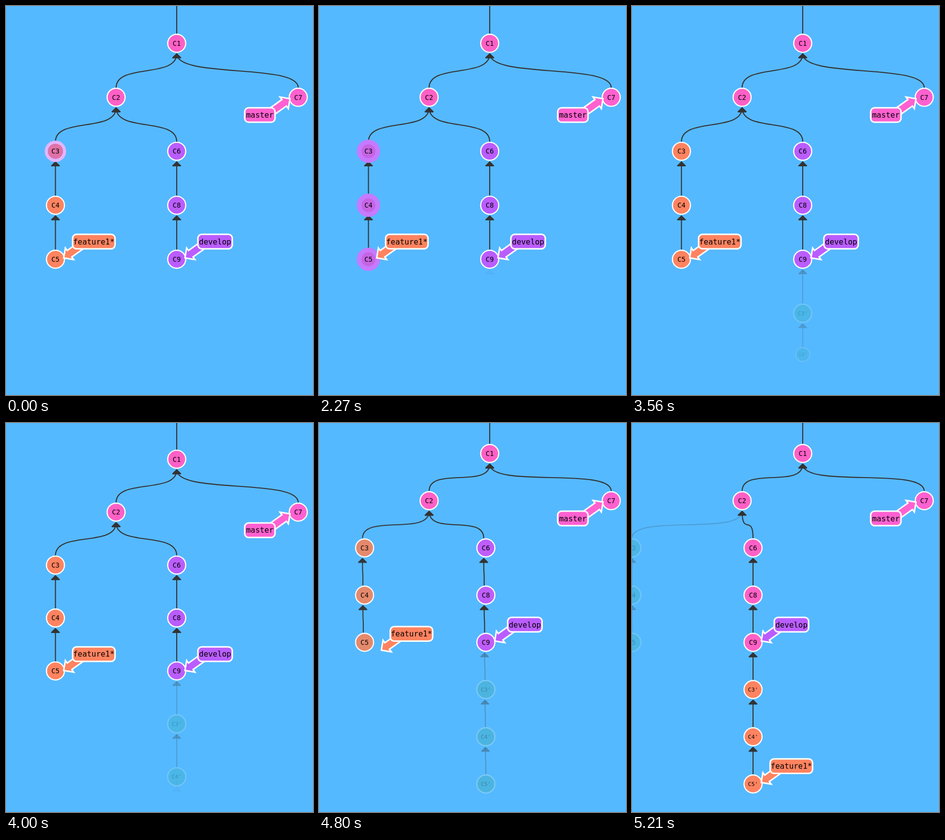
Write an HTML page with a canvas that moves like this. It is 624 by 791 pixels and loops after 7210 ms.

```html
<!DOCTYPE html>
<html lang="en">
<head>
<meta charset="utf-8">
<title>Rebase</title>
<style>
  html, body { margin: 0; width: 100%; height: 100%; overflow: hidden; background: #55b9ff; }
  canvas { display: block; width: 624px; height: 791px; }
</style>
</head>
<body>
<canvas></canvas>
<script>
const W = 624, H = 791, LOOP = 7210;
const BEAT = 101.35, BEAT_OFFSET = 35; // the picture holds for one beat
const LABEL_LAG = 9;
const STAGE = 765; // time for one commit to light up or to drop
const FONT = '"DejaVu Sans Mono", monospace';
const PINK = [255, 96, 198], MASTER = [255, 97, 208], PURPLE = [186, 93, 255];
const ORANGE = [255, 131, 96], ORPHAN = [35, 168, 140], WHITE = [255, 255, 255];

// Chains of commits, each hanging from a parent; later chains are drawn behind.
const CHAINS = [
  { kind: 'trunk', names: ['C0', 'C1'], level: 0, x: 347 },
  { kind: 'trunk', names: ['C2'], parent: 'C1', level: 2, x: 223.8 },
  { kind: 'master', names: ['C7'], parent: 'C1', level: 2, x: 594 },
  { kind: 'feature', names: ['C3', 'C4', 'C5'], parent: 'C2', level: 3, x: 100.5 },
  { kind: 'develop', names: ['C6', 'C8', 'C9'], parent: 'C2', level: 3, x: 347 },
  { kind: 'copy', names: ["C3'", "C4'", "C5'"], parent: 'C9', level: 6, x: 347 }
];

const ctx = document.querySelector('canvas').getContext('2d');
const ratio = window.devicePixelRatio || 1;
ctx.canvas.width = W * ratio;
ctx.canvas.height = H * ratio;
ctx.scale(ratio, ratio);
ctx.textAlign = 'center';

const lerp = (a, b, p) => a + (b - a) * p;
const mix = (a, b, p) => a.map((v, i) => lerp(v, b[i], p));
const css = c => `rgb(${c.map(Math.round).join(',')})`;

const sineOut = p => Math.sin(p * Math.PI / 2);
const smooth = p => p * p * (3 - 2 * p);
const cubicInOut = p => p < .5 ? 4 * p ** 3 : 1 - 4 * (1 - p) ** 3;
function bounce(p) {
  const k = 7.5625, hop = (mid, low) => k * (p - mid / 2.75) ** 2 + low;
  if (p < 1 / 2.75) return k * p * p;
  if (p < 2 / 2.75) return hop(1.5, .75);
  return p < 2.5 / 2.75 ? hop(2.25, .9375) : hop(2.625, .984375);
}
const tween = (t, start, length, ease) => ease(Math.min(1, Math.max(0, (t - start) / length)));

const rebaseAt = t => tween(t, 4640, 590, cubicInOut);
const gapAt = t => lerp(109.8, 96, tween(t, 3838, 440, cubicInOut));
const glowAt = (t, i) => tween(t, STAGE * i - 130, 440, sineOut) * (1 - tween(t, 2165, 370, smooth));
const growthAt = (t, i) => tween(t, 2165 + 865 * i, STAGE, bounce);

function buildNodes(t) {
  const gap = gapAt(t), rebase = rebaseAt(t), nodes = {};
  const rowY = level => -34 + gap * level;
  for (const { kind, names, parent, level: top, x } of CHAINS) {
    names.forEach((name, i) => {
      const level = top + i;
      const n = { name, x, y: rowY(level), parent: i ? names[i - 1] : parent, size: 1, alpha: 1, glow: 0, lead: 0 };
      if (level > 2) {
        n.x -= 101 * rebase;
        n.lead = -12 * rebase * (1 - rebase) * (8 - level);
      }
      if (kind === 'trunk') n.fill = PINK;
      if (kind === 'master') n.fill = MASTER;
      if (kind === 'develop') n.fill = mix(PURPLE, PINK, rebase);
      if (kind === 'feature') {
        n.glow = glowAt(t, i);
        n.fill = mix(mix(ORANGE, PURPLE, n.glow), ORPHAN, rebase);
        n.alpha = lerp(1, .2, rebase);
      }
      if (kind === 'copy') {
        n.size = growthAt(t, i);
        n.y = lerp(rowY(level - 1), n.y, n.size);
        n.fill = mix(ORPHAN, ORANGE, rebase);
        n.alpha = lerp(.2 * n.size, 1, rebase);
      }
      nodes[name] = n;
    });
  }
  return nodes;
}

// Line and arrowhead form one path, so a faded edge keeps an even tone.
function drawEdge(n, parent) {
  const x1 = n.x + n.lead, y1 = n.y - 19.5 * n.size;
  const x2 = parent.x + parent.lead, y2 = parent.y + 21.5;
  const bend = 50 * n.size, head = 8;
  ctx.globalAlpha = n.alpha;
  ctx.strokeStyle = ctx.fillStyle = '#333';
  ctx.lineWidth = 2.1;
  ctx.lineJoin = 'round';
  ctx.beginPath();
  ctx.moveTo(x1, y1);
  ctx.bezierCurveTo(x1, y1 - bend, x2, y2 + bend, x2, y2);
  ctx.lineTo(x2 - head, y2 + head);
  ctx.lineTo(x2 + head, y2 + head);
  ctx.lineTo(x2, y2);
  ctx.stroke();
  ctx.beginPath();
  ctx.moveTo(x2, y2);
  ctx.lineTo(x2 - head, y2 + head);
  ctx.lineTo(x2 + head, y2 + head);
  ctx.fill();
}

function drawNode(n) {
  ctx.globalAlpha = n.alpha;
  ctx.fillStyle = css(n.fill);
  ctx.strokeStyle = css(mix(WHITE, PURPLE, n.glow));
  ctx.lineWidth = (2.4 + 8.6 * n.glow) * n.size;
  ctx.beginPath();
  ctx.arc(n.x, n.y, (18.3 + .7 * n.glow) * n.size, 0, 2 * Math.PI);
  ctx.fill();
  ctx.stroke();
  const px = (n.name.length > 2 ? 11.3 : 13.8) * n.size;
  ctx.fillStyle = '#000';
  ctx.font = `${px}px ${FONT}`;
  ctx.fillText(n.name, n.x, n.y + px * .36);
}

// The arrow points at (x, y); side is 1 for a label up right, -1 for down left.
function drawBranch(text, x, y, side, fill) {
  const tip = 14.5, shaft = 8, length = 56;
  ctx.globalAlpha = 1;
  ctx.fillStyle = css(fill);
  ctx.strokeStyle = '#fff';
  ctx.lineWidth = 3;

  ctx.save();
  ctx.translate(x + side * 16.8, y - side * 2.8);
  ctx.rotate(side > 0 ? -.62 : Math.PI - .62);
  ctx.lineJoin = 'miter';
  ctx.beginPath();
  ctx.moveTo(0, 0);
  ctx.lineTo(tip, -tip);
  ctx.lineTo(tip, -shaft);
  ctx.lineTo(length, -shaft);
  ctx.lineTo(length, shaft);
  ctx.lineTo(tip, shaft);
  ctx.lineTo(tip, tip);
  ctx.closePath();
  ctx.fill();
  ctx.stroke();
  ctx.restore();

  const width = 12.5 + 8.2 * text.length;
  const cx = x + side * 78, cy = y - side * 36;
  ctx.beginPath();
  ctx.roundRect(cx - width / 2, cy - 14.7, width, 29.4, 8);
  ctx.fill();
  ctx.stroke();
  ctx.fillStyle = '#000';
  ctx.font = `15.5px ${FONT}`;
  ctx.fillText(text, cx, cy + 5.5);
}

function drawBranches(t) {
  const { C5, C7, C9 } = buildNodes(t), rebase = rebaseAt(t);
  drawBranch('master', C7.x, C7.y, -1, MASTER);
  drawBranch('develop', C9.x, C9.y, 1, PURPLE);
  drawBranch('feature1*', lerp(100.5, 246, rebase), lerp(C5.y, C5.y + 3 * gapAt(t), rebase), 1, ORANGE);
}

function draw(t) {
  const nodes = buildNodes(t), backToFront = Object.values(nodes).reverse().filter(n => n.size > 0);
  ctx.globalAlpha = 1;
  ctx.fillStyle = '#55b9ff';
  ctx.fillRect(0, 0, W, H);
  for (const n of backToFront) if (n.parent) drawEdge(n, nodes[n.parent]);
  backToFront.forEach(drawNode);
  drawBranches(t - LABEL_LAG);
}

const start = performance.now();
function tick() {
  const t = (performance.now() - start) % LOOP;
  draw(Math.max(0, Math.floor((t - BEAT_OFFSET) / BEAT) * BEAT + BEAT_OFFSET));
  requestAnimationFrame(tick);
}
tick();
</script>
</body>
</html>
```
